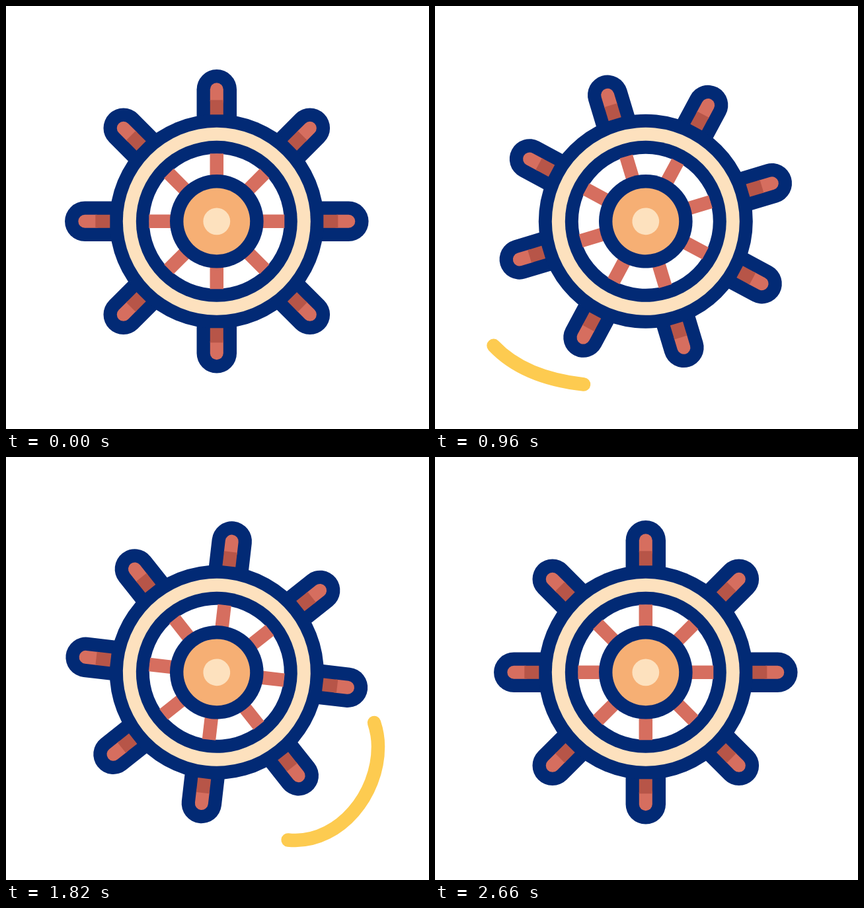
An HTML page with a canvas that plays this animation: 640x640 px, repeating every 2680 ms.

```html
<!DOCTYPE html>
<html lang="en">
<head>
<meta charset="utf-8">
<title>Ship wheel</title>
<style>
  html, body { margin: 0; width: 100%; height: 100%; overflow: hidden; background: #fff; }
  canvas { display: block; }
</style>
</head>
<body>
<canvas id="stage" width="640" height="640"></canvas>
<script>
const ctx = document.getElementById('stage').getContext('2d');
const LOOP = 2680;
const CENTER = { x: 318.8, y: 325.8 };
const NAVY = '#022a75', CREAM = '#fde1be', ORANGE = '#f6af74';
const RED = '#d66e5f', DARK_RED = '#b75548', YELLOW = '#fdcb50';

// Wheel rotation: [time in ms, degrees, degrees per ms]
const TURN = [
  [200, 0, 0], [740, -35.5, -0.118], [1180, -82, -0.065], [1345, -87.5, 0],
  [1480, -82.8, 0.07], [1820, -38.55, 0.152], [2140, -3, 0.055],
  [2320, 2, 0], [2660, 0, 0]
];

// Each streak is a chain of cubic curves; head and tail give start and end times.
const STREAKS = [
  { points: [49, 407, 49, 500, 112, 560, 225, 572.5], head: [340, 770], tail: [800, 1170] },
  { points: [557, 402, 561, 414, 563, 426, 563, 438,
             563, 512, 505, 580, 438, 580,
             422, 580, 409, 577, 395, 571], head: [1440, 1870], tail: [1880, 2260] }
];
STREAKS.forEach(streak => {
  const [x, y, ...rest] = streak.points;
  let d = `M${x} ${y}`;
  for (let i = 0; i < rest.length; i += 6) d += `C${rest.slice(i, i + 6).join(' ')}`;
  const path = document.createElementNS('http://www.w3.org/2000/svg', 'path');
  path.setAttribute('d', d);
  streak.length = path.getTotalLength();
  streak.path = new Path2D(d);
});

function progress(t, [start, end]) {
  return Math.min(1, Math.max(0, (t - start) / (end - start)));
}

function wheelAngle(t) {
  const next = TURN.findIndex(key => key[0] > t);
  if (next <= 0) return 0;
  const [t0, a0, s0] = TURN[next - 1], [t1, a1, s1] = TURN[next];
  const span = t1 - t0, u = (t - t0) / span, v = 1 - u;
  return v * v * (1 + 2 * u) * a0 + u * u * (3 - 2 * u) * a1
    + u * v * span * (v * s0 - u * s1);
}

function disc(radius, color) {
  ctx.fillStyle = color;
  ctx.beginPath();
  ctx.arc(0, 0, radius, 0, Math.PI * 2);
  ctx.fill();
}

function radial(from, to, width, color, cap) {
  ctx.strokeStyle = color;
  ctx.lineWidth = width;
  ctx.lineCap = cap;
  ctx.beginPath();
  ctx.moveTo(0, -from);
  ctx.lineTo(0, -to);
  ctx.stroke();
}

function eachSpoke(draw) {
  for (let i = 0; i < 8; i++) {
    ctx.save();
    ctx.rotate(i * Math.PI / 4);
    draw();
    ctx.restore();
  }
}

function drawWheel(angle) {
  ctx.save();
  ctx.translate(CENTER.x, CENTER.y);
  ctx.rotate(angle * Math.PI / 180);
  eachSpoke(() => radial(140, 199.5, 60.5, NAVY, 'round'));
  disc(162, NAVY);
  eachSpoke(() => {
    radial(182, 199.5, 20, RED, 'round');
    radial(161.5, 183.5, 20, DARK_RED, 'butt');
  });
  disc(142, CREAM);
  disc(122, NAVY);
  disc(102, '#fff');
  eachSpoke(() => radial(60, 102.5, 20.5, RED, 'butt'));
  disc(70.8, NAVY);
  disc(50.4, ORANGE);
  disc(20.4, CREAM);
  ctx.restore();
}

function drawStreak({ path, length, head, tail }, t) {
  const to = progress(t, head) * length;
  const from = progress(t, tail) * length;
  if (to - from < 0.5) return;
  ctx.save();
  ctx.strokeStyle = YELLOW;
  ctx.lineWidth = 20.5;
  ctx.lineCap = 'round';
  ctx.setLineDash([to - from, length * 3]);
  ctx.lineDashOffset = -from;
  ctx.stroke(path);
  ctx.restore();
}

function frame() {
  const t = performance.now() % LOOP;
  ctx.fillStyle = '#fff';
  ctx.fillRect(0, 0, 640, 640);
  STREAKS.forEach(streak => drawStreak(streak, t));
  drawWheel(wheelAngle(t));
  requestAnimationFrame(frame);
}
frame();
</script>
</body>
</html>
```
